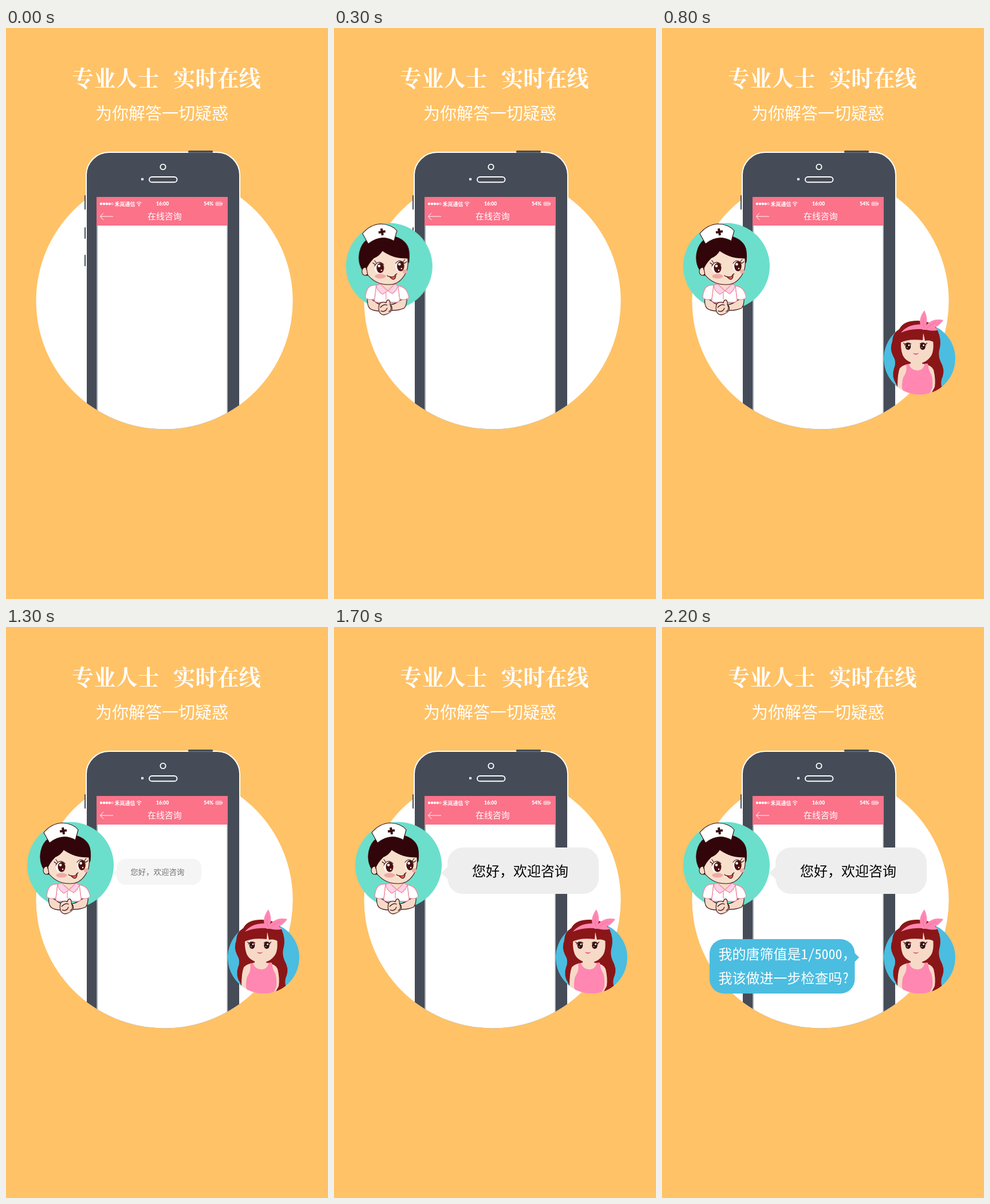
These frames come from a looping animation (562x997 px, 4.2 s). An HTML page:

```html
<!DOCTYPE html>
<html lang="zh-CN">
<head>
<meta charset="utf-8">
<title>在线咨询</title>
<style>
  html, body { margin: 0; width: 100%; height: 100%; overflow: hidden; background: #ffc267; }
  svg { display: block; width: 100vw; height: 100vh; }
  text { font-family: "Noto Sans Mono CJK SC", "Noto Sans CJK SC", "Noto Sans CJK", sans-serif; }
  .title { font: 900 38.2px "Noto Serif CJK SC", "Noto Sans CJK SC", "Noto Sans CJK", sans-serif; }
  .subtitle { font: 300 29px "Noto Sans CJK SC", "Noto Sans CJK", sans-serif; }
  .white { fill: #fff; }
  .line { fill: none; stroke: #fff; }
  .slate { fill: #454c57; }
  .skin { fill: #f7d9c7; }
  .hair { fill: #8a1618; }
  .pink { fill: #ff87b2; }
  .ink { stroke: #35070b; stroke-width: 1.1; stroke-linejoin: round; stroke-linecap: round; }
  .trim { stroke: #f08aa0; stroke-width: 1.3; stroke-linejoin: round; }
  .nofill { fill: none; }
  .status { font: 900 8.6px Lato, "Open Sans", sans-serif; fill: #fff; }

  /* 100 ms is 2.38095% of the loop */
  .nurse, .mother, .greeting, .question { animation: 4200ms -1ms infinite; }
  .nurse { animation-name: from-left; }
  .mother { animation-name: from-right; }
  .greeting { animation-name: greet; transform-origin: 187px 430px; }
  .question { animation-name: ask; transform-origin: 344px 593px; }

  @keyframes from-left {
    0% { transform: translateX(-188px); animation-timing-function: steps(4); }
    9.52381% { transform: translateX(41px); animation-timing-function: step-end; }
    11.90476%, 100% { transform: none; }
  }
  @keyframes from-right {
    0% { transform: translateX(237px); animation-timing-function: step-end; }
    7.14286% { transform: translateX(237px); animation-timing-function: steps(4); }
    16.66667% { transform: translateX(-31px); animation-timing-function: step-end; }
    19.04762%, 100% { transform: none; }
  }
  @keyframes greet {
    0% { opacity: 0; transform: scale(.56); animation-timing-function: step-end; }
    30.95238% { opacity: .56; transform: scale(.56); animation-timing-function: steps(4); }
    40.47619%, 100% { opacity: 1; transform: scale(1); }
  }
  @keyframes ask {
    0% { opacity: 0; transform: scale(.42); animation-timing-function: step-end; }
    42.85714% { opacity: .6; transform: scale(.42); animation-timing-function: step-end; }
    45.2381% { opacity: .8; transform: scale(.52); animation-timing-function: steps(3); }
    52.38095%, 100% { opacity: 1; transform: scale(1); }
  }
</style>
</head>
<body>
<svg viewBox="0 0 562 997" preserveAspectRatio="none">
  <defs>
    <clipPath id="stand"><path d="M0 0H562V476.5H500.5A224 224 0 0 1 52.5 476.5H0Z"/></clipPath>
    <clipPath id="badge"><path d="M380 480H520V577.5H512A62.5 62.5 0 0 1 387 577.5H380Z"/></clipPath>
  </defs>

  <rect width="562" height="997" fill="#ffc267"/>
  <g class="white">
    <text x="115" y="102" class="title">专业人士</text>
    <text x="292" y="102" class="title">实时在线</text>
    <text x="156" y="159.500" class="subtitle">为你解答一切疑惑</text>
  </g>
  <circle cx="276.500" cy="476.500" r="224" class="white"/>

  <g clip-path="url(#stand)">
    <g class="slate">
      <rect x="137" y="292" width="6" height="25" rx="1"/>
      <rect x="137" y="348" width="6" height="20" rx="1"/>
      <rect x="137" y="396" width="6" height="20" rx="1"/>
    </g>
    <rect x="140" y="217" width="268" height="600" rx="40" class="slate" stroke="#fff" stroke-width="2"/>
    <rect x="318" y="214" width="43" height="3.800" rx="1.500" class="slate"/>
    <g class="line" stroke-width="1.900">
      <circle cx="274" cy="242.500" r="4.600"/>
      <circle cx="238" cy="264" r="1.500" stroke-width="1.500"/>
      <rect x="250" y="260" width="48.500" height="9.300" rx="4.600"/>
    </g>
    <rect x="158" y="295" width="229" height="500" fill="#a5a9ae"/>
    <rect x="160" y="345" width="225.500" height="450" class="white"/>
    <rect x="158" y="295" width="229" height="50" fill="#fb7289"/>
  </g>

  <g class="white">
    <circle cx="166" cy="307" r="2.200"/>
    <circle cx="171" cy="307" r="2.200"/>
    <circle cx="175.800" cy="307" r="2.200"/>
    <circle cx="180.600" cy="307" r="2.200"/>
    <circle cx="185.400" cy="307" r="1.800" class="line" stroke-width=".8"/>
    <text x="189.500" y="310.700" font-size="9" font-weight="700">禾岚通信</text>
    <circle cx="232.200" cy="310" r="1.200"/>
    <path class="line" stroke-width="1.200" d="M228 305.500Q232.200 302 236.400 305.500M229.800 307.700Q232.200 305.600 234.600 307.700"/>
    <text x="262" y="310" class="status">16:00</text>
    <text x="345" y="310" class="status">54%</text>
    <rect x="366.200" y="304.200" width="10.200" height="5.600" rx="1" class="line" stroke-width=".9"/>
    <path d="M367.700 305.700h1.800v2.600h-1.800zM370.400 305.700h1.800v2.600h-1.800zM373.100 305.700h1.800v2.600h-1.800zM377 305.800h1v2.500h-1z"/>
    <path class="line" d="M187 329H164.500M170 323L164.500 329L170 335"/>
    <text x="247" y="333.800" font-size="14.900">在线咨询</text>
  </g>

  <g class="nurse">
    <circle cx="112.500" cy="416" r="75.500" fill="#6bdfcb"/>
    <!-- dress and arms -->
    <path class="skin ink" d="M75 470Q73 484 79 490Q87 495 100 494L103 484Q93 483 87 477ZM143 470Q144 483 139 489Q128 494 114 493L112 484Q124 482 131 476Z"/>
    <path class="white trim" d="M90 449Q109 457 128 450L131 474Q131 478 126 479H92Q86 478 87 474Z"/>
    <path class="white trim" d="M90 449Q76 448 73 460Q70 470 72 472Q80 476 87 473ZM128 450Q141 452 144 461Q148 470 146 472Q138 476 131 473Z"/>
    <path class="skin" d="M98 440H121V449L110 459L98 449Z"/>
    <path class="trim" fill="#fbd2e6" d="M97 447L110 459L101 465Q91 459 90 449ZM122 447L110 459L118 464Q126 458 128 450Z"/>
    <path class="trim nofill" d="M107 462V474"/>
    <path class="skin ink" d="M96 481Q102 477 107 480Q108 474 112 475Q115 478 114 483Q119 487 117 493Q113 498 107 500Q99 503 95 495Q93 487 96 481Z"/>
    <path class="ink nofill" d="M97 488Q104 481 109 484M98 494Q106 497 109 489M112 495Q118 492 115 485"/>
    <!-- head -->
    <path class="ink" fill="#310509" d="M73 432Q56 414 61 391Q67 363 100 362Q133 361 144 380Q149 389 147 408L139 424Z"/>
    <ellipse cx="70.500" cy="425" rx="5.500" ry="7" class="skin ink"/>
    <path class="ink" fill="#f8dfcc" d="M73 419Q77 407 86 400Q96 396 100 388Q113 399 145 402Q147 421 139 432Q129 448 113 448Q90 449 75 431Z"/>
    <path fill="#310509" d="M72 423Q71 402 88 385Q101 379 101 389Q96 398 86 402Q76 412 72 423ZM99 386Q125 372 146 402Q116 404 99 386Z"/>
    <g fill="#efa9a4">
      <ellipse cx="97" cy="433.500" rx="9.500" ry="4"/>
      <ellipse cx="140" cy="425" rx="4" ry="3.500"/>
    </g>
    <g class="white">
      <ellipse cx="95" cy="419" rx="8" ry="9.500"/>
      <ellipse cx="131" cy="416" rx="7.500" ry="9.500"/>
    </g>
    <g fill="#48100f">
      <ellipse cx="97" cy="419" rx="6.500" ry="8.700"/>
      <ellipse cx="132.500" cy="416" rx="6.300" ry="8.700"/>
    </g>
    <g class="white">
      <circle cx="95" cy="415.500" r="2.300"/>
      <circle cx="99" cy="423" r="1.200"/>
      <circle cx="130.500" cy="412.500" r="2.300"/>
      <circle cx="134" cy="420" r="1.200"/>
    </g>
    <path class="ink nofill" d="M87 416Q93 404 103 413M124 411Q130 402 139 411M88 413L84 410M90 410L87 406M137 408L140 404M139 411L143 408"/>
    <path class="ink" fill="#e95b52" d="M113 434Q120 436 124 431Q124 439 119.500 439Q116 438 113 434Z"/>
    <path class="ink nofill" d="M109 432Q110 434 113 434M123 431L126 429"/>
    <!-- cap -->
    <path class="ink" fill="#fff" d="M66 359Q79 343 98 342Q117 343 126 354L121 372Q98 359 76 377Z"/>
    <path fill="#35070b" transform="rotate(-10 100 356)" d="M98 350h4v4h4v4h-4v4h-4v-4h-4v-4h4z"/>
  </g>

  <g class="mother" clip-path="url(#badge)">
    <circle cx="449.500" cy="577.500" r="62.500" fill="#4bbde0"/>
    <path class="hair" d="M414 526Q421 511 446 511Q474 512 481 528Q488 544 485 558Q481 570 486 582Q494 596 490 608Q485 618 489 630L478 645H410Q415 633 409 622Q400 609 405 594Q410 583 403 572Q397 560 402 547Q402 533 414 526Z"/>
    <path class="skin" d="M434 578H454V586Q470 588 474 597Q478 614 476 627L466 645H424L411 627Q411 604 415 594Q420 588 434 586Z"/>
    <path class="pink" d="M426 587H431Q435 598 446 598Q456 598 459 586H464Q465 598 470 605Q473 614 472 628L464 645H426L419 629Q418 613 424 605Q428 598 426 587Z"/>
    <path class="skin" d="M418 538Q445 527 472 538Q476 561 470 572Q461 586 444 586Q426 584 420 571Q415 557 418 538Z"/>
    <path class="hair" d="M415 550Q414 524 446 523Q473 524 475 549Q468 544 459 546L456 532L455 545Q429 542 415 550Z"/>
    <path class="pink" d="M417 532Q431 515 459 518Q475 520 482 527Q475 530 461 527Q438 523 417 532Z"/>
    <path class="pink" d="M455 527Q444 511 458 493Q465 508 461 519Q472 506 491 510Q480 526 460 527Z"/>
    <path fill="none" stroke="#ef629a" stroke-width=".7" d="M458 524Q454 514 457 506M462 524Q471 517 478 514"/>
    <g fill="#351010">
      <ellipse cx="429.500" cy="556" rx="4.800" ry="6"/>
      <ellipse cx="455" cy="556" rx="4.800" ry="6"/>
      <path fill="none" stroke="#351010" stroke-width="1.300" d="M423 554Q428 547 435 552M450 552Q456 547 461 554M425 552L421 550M460 552L463 550"/>
    </g>
    <g class="white">
      <circle cx="431" cy="554" r="1.400"/>
      <circle cx="428" cy="558" r=".8"/>
      <circle cx="456.500" cy="554" r="1.400"/>
      <circle cx="453.500" cy="558" r=".8"/>
    </g>
    <path fill="#e8607d" d="M437.500 567.500Q443 569 448.500 567.500Q443 573.500 437.500 567.500Z"/>
  </g>

  <g class="greeting">
    <path fill="#eee" d="M187 430L200 417V441Z"/>
    <rect x="198" y="385" width="264" height="81" rx="27" fill="#eee"/>
    <text x="241" y="435" font-size="24">您好，欢迎咨询</text>
  </g>

  <g class="question">
    <path fill="#4bbde0" d="M335 568L344 577L335 586Z"/>
    <rect x="83" y="545" width="253.500" height="95" rx="25" fill="#4bbde0"/>
    <g class="white" font-size="24">
      <text x="98.500" y="580">我的唐筛值是1/5000，</text>
      <text x="98.500" y="622">我该做进一步检查吗?</text>
    </g>
  </g>
</svg>
</body>
</html>
```
